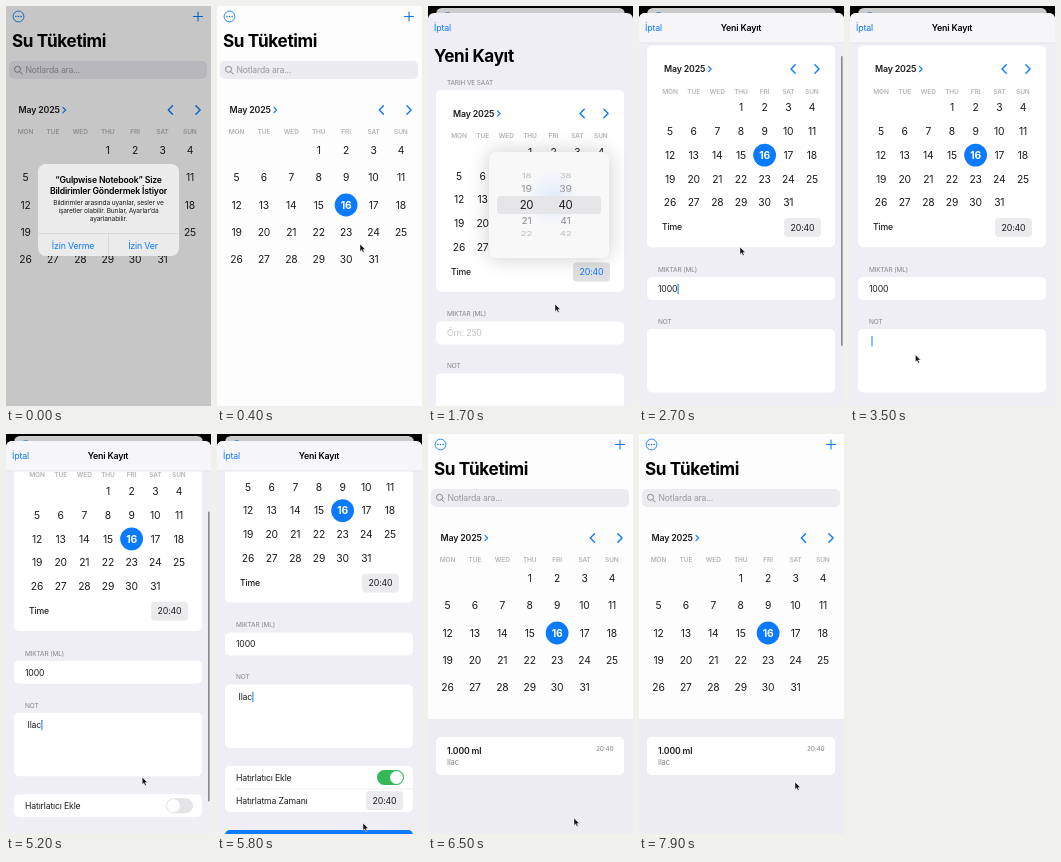
An HTML page for the animation above (8 s loop, 205 by 400 pixels).

```html
<!DOCTYPE html>
<html lang="tr">
<head>
<meta charset="utf-8">
<title>Su Tüketimi</title>
<style>
  html, body { margin: 0; width: 100%; height: 100%; overflow: hidden; background: #000; }
  svg { display: block; width: 205px; height: 400px; }
  text { font-family: Inter, "Noto Sans", sans-serif; letter-spacing: -0.02em; white-space: pre; }
</style>
</head>
<body>
<script>
const LOOP = 8000;
const BLUE = '#0a7aff', INK = '#1c1c1e', GREY = '#86868b', PALE = '#b4b4b9', SHEET = '#efeef4';
const NS = 'http://www.w3.org/2000/svg';

function el(parent, tag, attrs = {}) {
  const node = document.createElementNS(NS, tag);
  for (const k in attrs) node.setAttribute(k, attrs[k]);
  parent.appendChild(node);
  return node;
}
const group = (parent, attrs) => el(parent, 'g', attrs);
const box = (parent, x, y, width, height, rx, fill, more) =>
  el(parent, 'rect', { x, y, width, height, rx, fill, ...more });
const line = (parent, d, stroke, width = 1) =>
  el(parent, 'path', { d, stroke, 'stroke-width': width, fill: 'none',
    'stroke-linecap': 'round', 'stroke-linejoin': 'round' });
function label(parent, str, x, y, size, fill = INK, weight = 400, anchor = 'start') {
  const node = el(parent, 'text', { x, y, fill, 'font-size': size, 'font-weight': weight, 'text-anchor': anchor });
  node.textContent = str;
  return node;
}
const centred = (parent, str, x, y, size, fill, weight) =>
  label(parent, str, x, y, size, fill, weight, 'middle');

// Month view: first column centre x, column gap, month centre y, first row centre y, row gap
function calendar(parent, { x, dx, left, month, head, row, dy }) {
  label(parent, 'May 2025', left, month + 3.2, 8.8, INK, 600);
  const c = left + 44.5;
  line(parent, `M${c} ${month - 2.6}l2.6 2.6l-2.6 2.6`, BLUE, 1.2);
  const prev = x + dx * 5 + 5 + 5, next = x + dx * 6 + 5;
  const shift = dx > 25 ? 2 : -1;
  line(parent, `M${prev + shift - 2} ${month - 4.2}l-4.2 4.2l4.2 4.2`, BLUE, 1.4);
  line(parent, `M${next + shift - 1} ${month - 4.2}l4.2 4.2l-4.2 4.2`, BLUE, 1.4);
  ['MON', 'TUE', 'WED', 'THU', 'FRI', 'SAT', 'SUN'].forEach((d, i) =>
    centred(parent, d, x + dx * i, head + 2.3, 6.5, PALE, 600));
  for (let day = 1; day <= 31; day++) {
    const cell = day + 2, cx = x + dx * (cell % 7), cy = row + dy * Math.floor(cell / 7);
    const today = day === 16;
    if (today) el(parent, 'circle', { cx, cy, r: 11.4, fill: BLUE });
    centred(parent, day, cx, cy + 3.7, 10.3, today ? '#fff' : INK, today ? 700 : 400);
  }
}

// Timed values
const tracks = [];
const smooth = p => p * p * (3 - 2 * p);
const out = p => 1 - (1 - p) ** 3;
const hard = () => 0;
function track(steps, apply, ease = smooth) { tracks.push({ steps, apply, ease }); }
function valueAt({ steps, ease }, t) {
  let i = 0;
  while (i + 1 < steps.length && steps[i + 1][0] <= t) i++;
  const [t0, ...a] = steps[i];
  if (t < t0 || i === steps.length - 1) return a;
  const [t1, ...b] = steps[i + 1];
  if (ease === hard) return a;
  const p = ease((t - t0) / (t1 - t0));
  return a.map((v, k) => v + (b[k] - v) * p);
}
const fade = (node, steps, ease) => track(steps, v => node.setAttribute('opacity', v), ease);
const move = (node, steps, ease) =>
  track(steps, (x, y) => node.setAttribute('transform', `translate(${x} ${y})`), ease);

const svg = el(document.body, 'svg', { viewBox: '0 0 205 400' });
box(svg, 0, 0, 205, 400, 0, '#000');

// Home
const home = group(svg);
const homeBg = box(home, 0, 0, 205, 450, 0, '#fdfdfd');
el(home, 'circle', { cx: 12.5, cy: 10.5, r: 5.4, fill: 'none', stroke: BLUE, 'stroke-width': 0.9 });
for (const x of [9.9, 12.5, 15.1]) el(home, 'circle', { cx: x, cy: 10.5, r: 0.8, fill: BLUE });
line(home, 'M187.5 10.5h9M192 6v9', BLUE, 1.1);
label(home, 'Su Tüketimi', 6, 41, 17.1, '#000', 700);
box(home, 3, 55, 198, 18, 5, '#ebebf0');
el(home, 'circle', { cx: 11.5, cy: 63.3, r: 3, fill: 'none', stroke: GREY, 'stroke-width': 1 });
line(home, 'M13.8 65.6l2.4 2.4', GREY, 1);
label(home, 'Notlarda ara...', 19.5, 67, 8.6, '#98989e');
calendar(home, { x: 19.5, dx: 27.4, left: 12.5, month: 104, head: 125.8, row: 144.3, dy: 27.35 });

const list = group(home);
box(list, 0, 285, 205, 165, 0, '#edecf2');
box(list, 8, 303, 188, 38, 5, '#fff');
label(list, '1.000 ml', 19, 319.6, 8.7, INK, 600);
label(list, 'Ilac', 19, 330.8, 7.6, GREY);
label(list, '20:40', 185.5, 317.4, 6.5, GREY, 400, 'end');
fade(list, [[0, 0], [6100, 1]], hard);

const dim = box(svg, 0, 0, 205, 400, 0, '#000');
fade(dim, [[0, 0.22], [80, 0.22], [320, 0], [600, 0], [900, 0.2], [6100, 0.2], [6500, 0]]);

const push = [[0, 0], [600, 0], [900, 1], [6100, 1], [6500, 0]];
track(push, k => {
  home.setAttribute('transform', `translate(${8.2 * k} ${2 * k}) scale(${1 - 0.08 * k})`);
  homeBg.setAttribute('rx', 6 * k);
});

// Permission dialog
const dialog = group(svg);
box(dialog, 32, 158, 141, 92, 7.5, '#ebebec');
centred(dialog, '“Gulpwise Notebook” Size', 102.5, 177, 8.7, '#000', 600);
centred(dialog, 'Bildirimler Göndermek İstiyor', 102.5, 187.6, 8.7, '#000', 600);
['Bildirimler arasında uyarılar, sesler ve', 'işaretler olabilir. Bunlar, Ayarlar’da', 'ayarlanabilir.']
  .forEach((s, i) => centred(dialog, s, 102.5, 199 + 8.2 * i, 6.6, INK));
line(dialog, 'M32 227.5h141M102.5 227.5v22.5', '#c9c9cb', 0.5);
centred(dialog, 'İzin Verme', 67, 242.6, 8.8, BLUE);
centred(dialog, 'İzin Ver', 137, 242.6, 8.8, BLUE);
fade(dialog, [[0, 1], [80, 1], [300, 0]]);

// Entry sheet
const sheet = group(svg);
box(sheet, 0, 7, 205, 420, 6, SHEET);
const clip = el(el(svg, 'defs'), 'clipPath', { id: 'body' });
box(clip, 0, 7, 205, 420, 6, '#000');
const form = group(group(sheet, { 'clip-path': 'url(#body)' }));

const bigTitle = label(form, 'Yeni Kayıt', 6, 55.7, 17.1, '#000', 700);
fade(bigTitle, [[0, 1], [2100, 1], [2300, 0]]);
label(form, 'TARIH VE SAAT', 19, 78.9, 6.5, GREY);
box(form, 8, 84, 188, 201.7, 5, '#fff');
calendar(form, { x: 31, dx: 23.65, left: 25, month: 107.5, head: 129.7, row: 146, dy: 23.8 });
label(form, 'Time', 23, 268.8, 8.7, INK, 500);
const chip = box(form, 145, 256.5, 37, 19, 4, '#ebebed');
const chipText = centred(form, '20:40', 163.5, 269.2, 8.8);
track([[0, 0], [1350, 1], [1900, 0]], on => {
  chip.setAttribute('fill', on ? '#e0e0e3' : '#ebebed');
  chipText.setAttribute('fill', on ? BLUE : INK);
}, hard);

label(form, 'MIKTAR (ML)', 19, 310.4, 6.5, GREY);
box(form, 8, 315.5, 188, 23, 5, '#fff');
const hint = label(form, 'Örn: 250', 19, 330.3, 8.7, '#c3c3c7');
label(form, 'NOT', 19, 362.4, 6.5, GREY);
box(form, 8, 367.5, 188, 63.5, 5, '#fff');

// Types one letter per 100 ms from `start`; the caret shows between `focus` and `blur`
function typed(str, x, y, start, focus, blur) {
  const node = label(form, '', x, y, 8.7);
  const caret = box(form, x, y - 8.3, 1, 10.5, 0.5, BLUE);
  tracks.push({ run(t) {
    const n = Math.max(0, Math.min(str.length, Math.floor((t - start) / 100) + 1));
    node.textContent = str.slice(0, n);
    caret.setAttribute('x', x + (n ? node.getComputedTextLength() + 0.3 : 0));
    caret.setAttribute('opacity', t >= focus && t < blur ? 1 : 0);
    if (str === '1000') hint.setAttribute('opacity', n ? 0 : 1);
  } });
}
typed('1000', 19, 330.3, 2400, 2100, 3500);
typed('Ilac', 21.5, 382.7, 4600, 3500, 6500);

// Reminder rows
const remindBox = box(form, 8, 449, 188, 46, 5, '#fff');
label(form, 'Hatırlatıcı Ekle', 19, 463.7, 8.7);
const rail = box(form, 160, 453, 27, 15, 7.5, '#e4e4e7');
const railOn = box(form, 160, 453, 27, 15, 7.5, '#35b957');
const knob = el(form, 'circle', { cx: 167.5, cy: 460.5, r: 6.5, fill: '#fff' });
const remind = group(form);
line(remind, 'M19 472h177', '#dcdce0', 0.5);
label(remind, 'Hatırlatma Zamanı', 19, 486.9, 8.7);
box(remind, 149, 474, 37, 19, 4, '#ebebed');
centred(remind, '20:40', 167.5, 486.7, 8.8);
const save = group(form);
box(save, 8, 513, 188, 27, 5, BLUE);
centred(save, 'Kaydet', 102, 529.7, 8.8, '#fff', 600);
track([[0, 0], [5450, 0], [5650, 1]], k => {
  railOn.setAttribute('opacity', k);
  knob.setAttribute('cx', 167.5 + 12 * k);
  remind.setAttribute('opacity', k);
  remindBox.setAttribute('height', 23 + 23 * k);
  save.setAttribute('transform', `translate(0 ${23 * (k - 1)})`);
});
move(form, [[0, 0, 0], [2100, 0, 0], [2350, 0, -44.5], [5000, 0, -44.5], [5350, 0, -117],
  [5820, 0, -117], [5980, 0, -147]]);

// Sheet bar
const bar = group(sheet);
el(bar, 'path', { d: 'M0 37V13a6 6 0 0 1 6 -6h193a6 6 0 0 1 6 6v24z', fill: '#f6f6f9' });
line(bar, 'M0 37h205', '#d6d6da', 0.5);
centred(bar, 'Yeni Kayıt', 102, 25.2, 8.8, '#000', 600);
fade(bar, [[0, 0], [2100, 0], [2250, 1]]);
label(sheet, 'İptal', 6, 25.2, 8.8, BLUE);

const thumb = box(sheet, 202, 50, 1.6, 290, 0.8, '#87878c');
fade(thumb, [[0, 0], [2100, 0], [2200, 1], [2800, 1], [3000, 0], [5000, 0], [5050, 1], [5450, 1], [5650, 0]]);
track([[0, 50], [5000, 50], [5350, 95]], y => thumb.setAttribute('y', y));

// Time wheel
const wheel = group(sheet);
const panel = box(wheel, 61, 146, 120, 106, 7, '#f8f8f9');
panel.style.filter = 'drop-shadow(0 0 10px rgba(0,0,0,.2))';
const glow = el(svg.querySelector('defs'), 'radialGradient', { id: 'glow' });
el(glow, 'stop', { offset: 0, 'stop-color': '#4aa3ff', 'stop-opacity': 0.14 });
el(glow, 'stop', { offset: 1, 'stop-color': '#4aa3ff', 'stop-opacity': 0 });
el(wheel, 'circle', { cx: 125, cy: 192, r: 28, fill: 'url(#glow)' });
box(wheel, 69, 190, 104, 18, 4, '#e6e6e9');
const rows = [[169.5, 9.6, 0.65, '#bcbcc0'], [183, 10.4, 0.88, '#8f8f94'], [199, 11.4, 1, INK],
  [215, 10.4, 0.88, '#8f8f94'], [228, 9.6, 0.65, '#bcbcc0']];
rows.forEach(([y, size, squash, fill], i) => {
  const g = group(wheel, { transform: `translate(0 ${y}) scale(1 ${squash})` });
  centred(g, 18 + i, 98.5, size * 0.36, size, fill);
  centred(g, 38 + i, 137.5, size * 0.36, size, fill);
});
track([[0, 0], [1380, 0], [1580, 1], [1850, 1], [2050, 0]], k => {
  wheel.setAttribute('opacity', k);
  wheel.setAttribute('transform', `translate(163 256) scale(${0.4 + 0.6 * k}) translate(-163 -256)`);
}, out);

move(sheet, [[0, 0, 400], [600, 0, 400], [900, 0, 0], [6100, 0, 0], [6500, 0, 400]], out);

// Pointer
const pointer = group(svg);
el(pointer, 'path', { d: 'M0 0v7.4l1.7 -1.5l1.2 2.7l1.3 -.6l-1.2 -2.6h2.3z',
  fill: '#111', stroke: '#fff', 'stroke-width': 0.5 });
fade(pointer, [[0, 0], [100, 1]], hard);
move(pointer, [[0, 143, 238], [400, 143, 238], [570, 190, 9], [650, 190, 9], [900, 188, 110],
  [1250, 165, 264], [1400, 165, 264], [1700, 127, 298], [1820, 118, 324], [2050, 112, 322],
  [2400, 101, 241], [2900, 101, 241], [3250, 8, 290], [3450, 60, 350], [3600, 80, 345],
  [5000, 80, 345], [5350, 172, 342], [5520, 172, 342], [5800, 146, 389], [5950, 146, 384],
  [7200, 146, 384], [7550, 91, 108], [7880, 156, 348]]);

const start = performance.now();
function render() {
  const t = (performance.now() - start) % LOOP;
  for (const tr of tracks) tr.run ? tr.run(t) : tr.apply(...valueAt(tr, t));
  requestAnimationFrame(render);
}
render();
</script>
</body>
</html>
```
